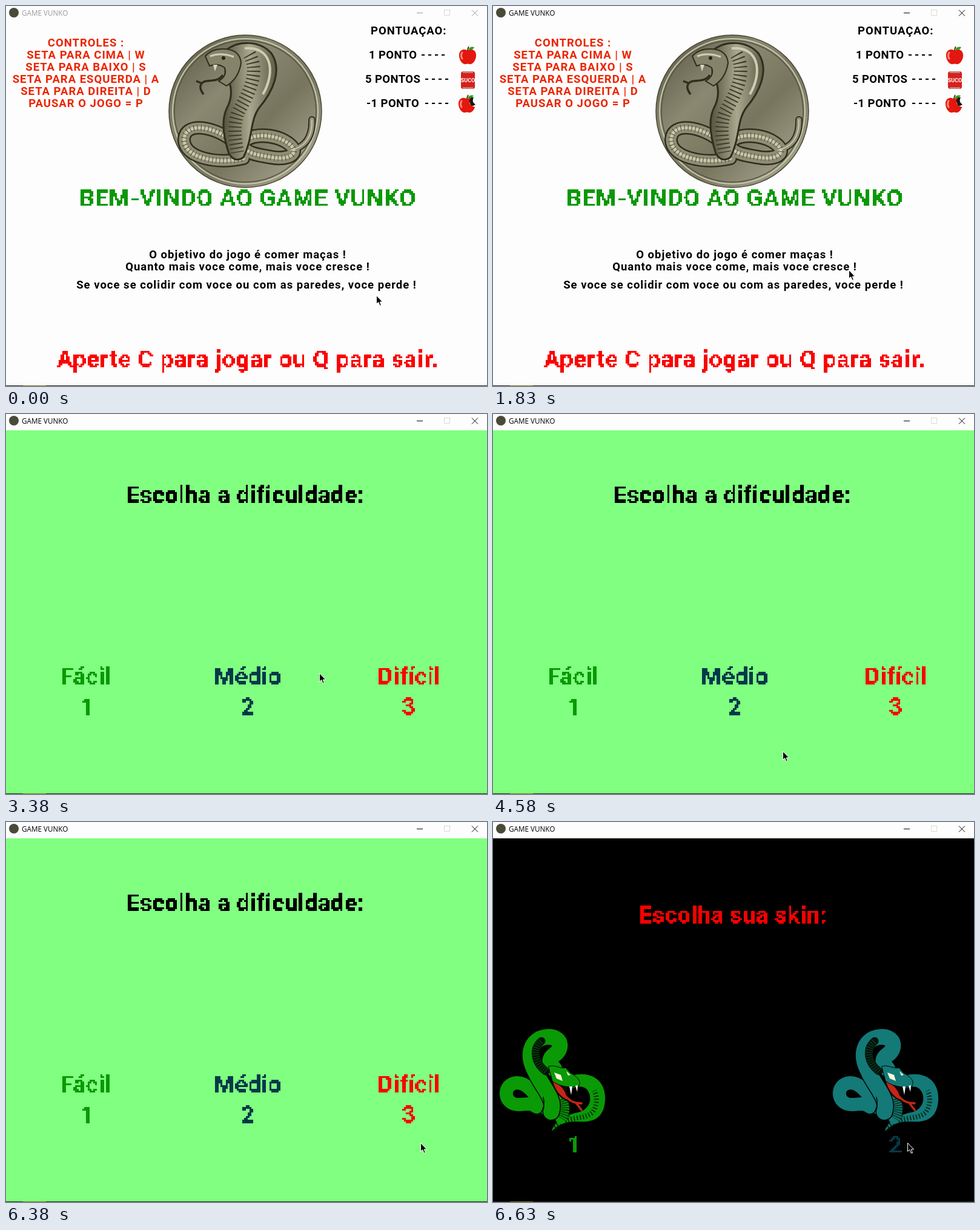
These frames come from a looping animation (794x628 px, 8 s). An HTML page:

```html
<!DOCTYPE html>
<html lang="pt">
<head>
<meta charset="utf-8">
<title>GAME VUNKO</title>
<style>
  html, body { margin: 0; width: 100%; height: 100%; overflow: hidden; background: #fdfdfd; }
  svg { display: block; width: 100vw; height: 100vh; }
  text { white-space: pre; }

  .small { font: bold 18.5px Roboto, sans-serif; letter-spacing: 1px; }
  .big { font: bold 39px Roboto, sans-serif; letter-spacing: .4px; filter: url(#pixelate); }
  .mid { text-anchor: middle; }
  .points { letter-spacing: .4px; }
  .dash { letter-spacing: 3.8px; }
  .title { letter-spacing: 1px; }
  .prompt { letter-spacing: .85px; }
  .bar { font: 11.7px "Open Sans", sans-serif; animation: focus 8s step-end infinite; }

  .welcome { animation: welcome 8s step-end infinite; }
  .level { animation: level 8s step-end infinite; }
  .skin { animation: skin 8s step-end infinite; }
  .cursor { animation: cursor 8s linear infinite; }

  @keyframes focus { 0% { color: #9b9b9b; } 21.375%, 100% { color: #000; } }
  @keyframes welcome { 0% { visibility: visible; } 42.25%, 100% { visibility: hidden; } }
  @keyframes level {
    0% { visibility: hidden; }
    42.25% { visibility: visible; }
    80.75%, 100% { visibility: hidden; }
  }
  @keyframes skin { 0% { visibility: hidden; } 80.75%, 100% { visibility: visible; } }
  @keyframes cursor {
    0%, 16.125% { transform: translate(611px, 478px); }
    17.75%, 21.375% { transform: translate(587px, 440px); }
    22.875%, 36% { transform: translate(587px, 436px); }
    38.5%, 52.125% { transform: translate(517px, 428px); }
    55% { transform: translate(473px, 505px); }
    57.25%, 63% { transform: translate(478px, 557px); }
    64.2% { transform: translate(590px, 578px); }
    65.625% { transform: translate(800px, 545px); }
    72.875% { transform: translate(800px, 552px); }
    74.5%, 76.625% { transform: translate(719px, 530px); }
    78.75%, 100% { transform: translate(684px, 530px); }
  }
</style>
</head>
<body>
<svg viewBox="0 0 794 628" xmlns="http://www.w3.org/2000/svg">
  <defs>
    <filter id="pixelate" filterUnits="userSpaceOnUse" x="0" y="0" width="794" height="628"
            color-interpolation-filters="sRGB">
      <feComponentTransfer in="SourceGraphic" result="hard">
        <feFuncA type="discrete" tableValues="0 1"/>
      </feComponentTransfer>
      <feFlood x="1" y="1" width="1" height="1"/>
      <feComposite x="0" y="0" width="3" height="3"/>
      <feTile result="grid"/>
      <feComposite in="hard" in2="grid" operator="in"/>
      <feMorphology operator="dilate" radius="1"/>
    </filter>

    <linearGradient id="metal" x1="0" y1="0" x2="1" y2="1">
      <stop offset="0" stop-color="#55543f"/>
      <stop offset=".35" stop-color="#8a8871"/>
      <stop offset=".6" stop-color="#77755e"/>
      <stop offset="1" stop-color="#b5b39c"/>
    </linearGradient>
    <linearGradient id="hood" x1="0" y1="0" x2="1" y2="0">
      <stop offset="0" stop-color="#55533c"/>
      <stop offset=".5" stop-color="#a9a78d"/>
      <stop offset="1" stop-color="#5d5b44"/>
    </linearGradient>

    <path id="leftCoil" d="M372 222C345 200 296 190 294 220C293 250 345 262 392 252"/>
    <path id="rightCoil" d="M388 242C382 212 430 208 458 222C492 240 470 256 438 250C415 246 398 244 392 232"/>
    <path id="tail" d="M470 238C492 234 506 218 505 188"/>

    <path id="loop" d="M98 480C80 476 66 431 40 431C15 432 16 467 42 467C56 467 62 463 72 471"/>
    <path id="neck" d="M96 479C104 458 80 436 70 413C53 382 64 355 93 355C116 357 113 377 102 384C92 391 92 398 101 408"/>
    <path id="belly" d="M87 412C68 397 65 375 80 362"/>

    <g id="apple">
      <path d="M0-8C-6-13-15-9-14 1C-13 10-7 15-3 14Q0 13 3 14C7 15 13 10 14 1C15-9 6-13 0-8Z" fill="#e3170f"/>
      <path d="M-9-5Q-12 0-9 5" fill="none" stroke="#ff8a74" stroke-width="3" stroke-linecap="round"/>
      <path d="M0-8Q0-12 2-15" fill="none" stroke="#5b3511" stroke-width="2"/>
      <path d="M1-10Q4-16 11-14Q8-8 1-10Z" fill="#2f9e1c"/>
    </g>

    <g id="serpent" stroke-linecap="round" stroke-linejoin="round">
      <path d="M130 419C165 410 187 430 185 460C183 490 165 497 140 495C120 494 108 500 97 511C100 496 120 484 140 480C160 476 166 455 155 442C150 436 140 436 132 440Z" fill="currentColor"/>
      <path d="M102 505C125 484 148 494 164 480C172 470 173 455 167 444" fill="none" stroke="#041a08" stroke-opacity=".8" stroke-width="8" stroke-dasharray="2 3" stroke-linecap="butt"/>
      <path d="M112 458Q122 474 112 490" fill="none" stroke="currentColor" stroke-width="18"/>
      <path d="M116 456Q126 474 115 491" fill="none" stroke="#041a08" stroke-opacity=".7" stroke-width="17" stroke-dasharray="2 2" stroke-linecap="butt"/>
      <g fill="none" stroke="#000">
        <use href="#loop" stroke-width="25"/>
        <use href="#loop" stroke="currentColor" stroke-width="22"/>
        <use href="#neck" stroke-width="29"/>
        <use href="#neck" stroke="currentColor" stroke-width="26"/>
        <use href="#belly" stroke="#031405" stroke-width="13"/>
        <use href="#belly" stroke="currentColor" stroke-opacity=".5" stroke-width="11" stroke-dasharray="1 3" stroke-linecap="butt"/>
        <path d="M83 455Q87 470 78 482" stroke-width="1.5"/>
      </g>
      <path d="M96 424L122 436L124 462C110 457 100 445 96 424Z" fill="#180404"/>
      <path d="M99 429C113 434 121 446 122 459C111 453 103 444 99 429Z" fill="#c62517"/>
      <path d="M116 450C124 457 127 462 137 464L146 476M137 464L146 465" fill="none" stroke="#c62517" stroke-width="3.5"/>
      <path d="M92 404C102 400 112 409 120 406L128 415C140 421 146 429 142 436C130 440 110 438 98 428Z" fill="currentColor" stroke="#000"/>
      <path d="M101 414L112 418L115 428L105 424ZM121 412L128 418L124 419Z" fill="#fff8dc"/>
      <path d="M126 437L131 437L129 451ZM136 436L140 435L139 446Z" fill="#fff"/>
    </g>
  </defs>

  <rect width="794" height="628" fill="#fdfdfd"/>

  <g class="welcome">
    <g class="small mid" fill="#ed2400">
      <text x="132" y="67">CONTROLES :</text>
      <text x="132" y="87">SETA PARA CIMA | W</text>
      <text x="132" y="107">SETA PARA BAIXO | S</text>
      <text x="132" y="127">SETA PARA ESQUERDA | A</text>
      <text x="132" y="147">SETA PARA DIREITA | D</text>
      <text x="132" y="167">PAUSAR O JOGO = P</text>
    </g>
    <g class="small">
      <text x="602" y="47">PONTUAÇAO:</text>
      <text class="points" x="599" y="87">1 PONTO</text><text class="dash" x="685" y="87">----</text>
      <text class="points" x="593" y="127">5 PONTOS</text><text class="dash" x="691" y="127">----</text>
      <text class="points" x="595" y="167">-1 PONTO</text><text class="dash" x="691" y="167">----</text>
    </g>

    <use href="#apple" x="762" y="82"/>
    <rect x="751" y="108" width="23" height="29" rx="4" fill="#d7201c"/>
    <path d="M754 109.5H771M754 135.5H771" stroke="#b9a8a0" stroke-width="2"/>
    <text x="762.5" y="126" class="mid" fill="#fff" font-family="Roboto, sans-serif" font-weight="bold" font-size="9">SUCO</text>
    <use href="#apple" x="761" y="162"/>
    <path d="M777 150Q764 149 766 158Q764 163 769 164Q771 168 777 166Z" fill="#fdfdfd"/>
    <path d="M768 151Q763 156 766 160Q766 165 771 165L775 163Q768 158 772 151Z" fill="#1c1714"/>

    <circle cx="395" cy="174" r="126" fill="url(#metal)" stroke="#4a4936" stroke-width="1.5"/>
    <circle cx="395" cy="174" r="120" fill="none" stroke="#c9c7b0" stroke-width="2"/>
    <circle cx="395" cy="174" r="117" fill="none" stroke="#55543f" stroke-width="1.5"/>
    <g fill="none" stroke-linecap="round">
      <g stroke="#2f2e1e"><use href="#leftCoil" stroke-width="22"/><use href="#rightCoil" stroke-width="24"/><use href="#tail" stroke-width="12"/></g>
      <g stroke="#8f8d74"><use href="#leftCoil" stroke-width="17"/><use href="#rightCoil" stroke-width="19"/><use href="#tail" stroke-width="8"/></g>
      <g stroke="#c9c7ac" stroke-width="5"><use href="#leftCoil"/><use href="#rightCoil"/><use href="#tail" stroke-width="2"/></g>
      <g stroke="#4b4934" stroke-width="10" stroke-dasharray="1 5" stroke-linecap="butt"><use href="#leftCoil"/><use href="#rightCoil"/></g>
    </g>
    <path d="M362 74C384 55 420 58 438 78C457 106 440 142 418 168C402 190 408 218 392 250Q378 260 368 244C358 214 356 188 364 170C376 148 372 128 362 112Z" fill="url(#hood)" stroke="#2f2e1e" stroke-width="3"/>
    <path d="M402 80C420 112 398 148 384 174C374 196 378 220 382 242" fill="none" stroke="#3d3c28" stroke-width="22" stroke-dasharray="2 5"/>
    <path d="M394 70C438 66 446 108 424 146" fill="none" stroke="#cfcdb2" stroke-width="4"/>
    <path d="M329 83Q340 70 360 71Q386 72 388 94Q384 120 364 132L351 124Q366 115 361 102Q350 94 336 99Z" fill="#85836a" stroke="#2f2e1e" stroke-width="2"/>
    <path d="M337 83Q354 76 376 84" fill="none" stroke="#d0ceb4" stroke-width="3"/>
    <circle cx="359" cy="86" r="3" fill="#24231a"/>
    <path d="M342 97L345 108L349 97" fill="#d8d6c0"/>
    <path d="M358 114C350 126 336 122 327 125C317 130 321 139 326 146M324 128L314 124" fill="none" stroke="#2f2e1e" stroke-width="3.5"/>

    <g class="big mid">
      <text class="title" x="399" y="331" fill="#0a9806">BEM-VINDO AO GAME VUNKO</text>
      <text class="prompt" x="399" y="597" fill="#fb0000">Aperte C para jogar ou Q para sair.</text>
    </g>
    <g class="small mid">
      <text x="399" y="417">O objetivo do jogo é comer maças !</text>
      <text x="399" y="437">Quanto mais voce come, mais voce cresce !</text>
      <text x="397" y="467">Se voce se colidir com voce ou com as paredes, voce perde !</text>
    </g>
  </g>

  <g class="level">
    <rect y="27" width="794" height="601" fill="#80ff80"/>
    <g class="big mid">
      <text x="395" y="147">Escolha a dificuldade:</text>
      <g fill="#0a9a06"><text x="132" y="447">Fácil</text><text x="135" y="497">1</text></g>
      <g fill="#003a4a"><text x="399" y="447">Médio</text><text x="399" y="497">2</text></g>
      <g fill="#fb0000"><text x="665" y="447">Difícil</text><text x="665" y="497">3</text></g>
    </g>
  </g>

  <g class="skin">
    <rect y="27" width="794" height="601"/>
    <g class="big mid">
      <text x="396" y="167" fill="#fb0000">Escolha sua skin:</text>
      <text x="135" y="547" fill="#0a9a06">1</text>
      <text x="665" y="547" fill="#063846">2</text>
    </g>
    <use href="#serpent" color="#0a9a06"/>
    <use href="#serpent" x="550" color="#137a78"/>
  </g>

  <path d="M0 627.5H794" stroke="#22261e"/>
  <path d="M28 627.5H66" stroke="#77751c"/>

  <g class="bar">
    <circle cx="13" cy="11" r="8" fill="#4a4a38"/>
    <text x="26" y="16" fill="currentColor">GAME VUNKO</text>
    <rect x="723.5" y="6.5" width="9" height="9" fill="none" stroke="#dcdcd0"/>
    <path d="M678 11.5H688M769 6.5L779 16.5M779 6.5L769 16.5" fill="none" stroke="currentColor"/>
  </g>

  <g class="cursor">
    <path d="M.5 .5V14.5L3.7 11.5L6 17H8.5L6.2 11H10.5Z" fill="#000" stroke="#fff"/>
  </g>
</svg>
</body>
</html>
```
